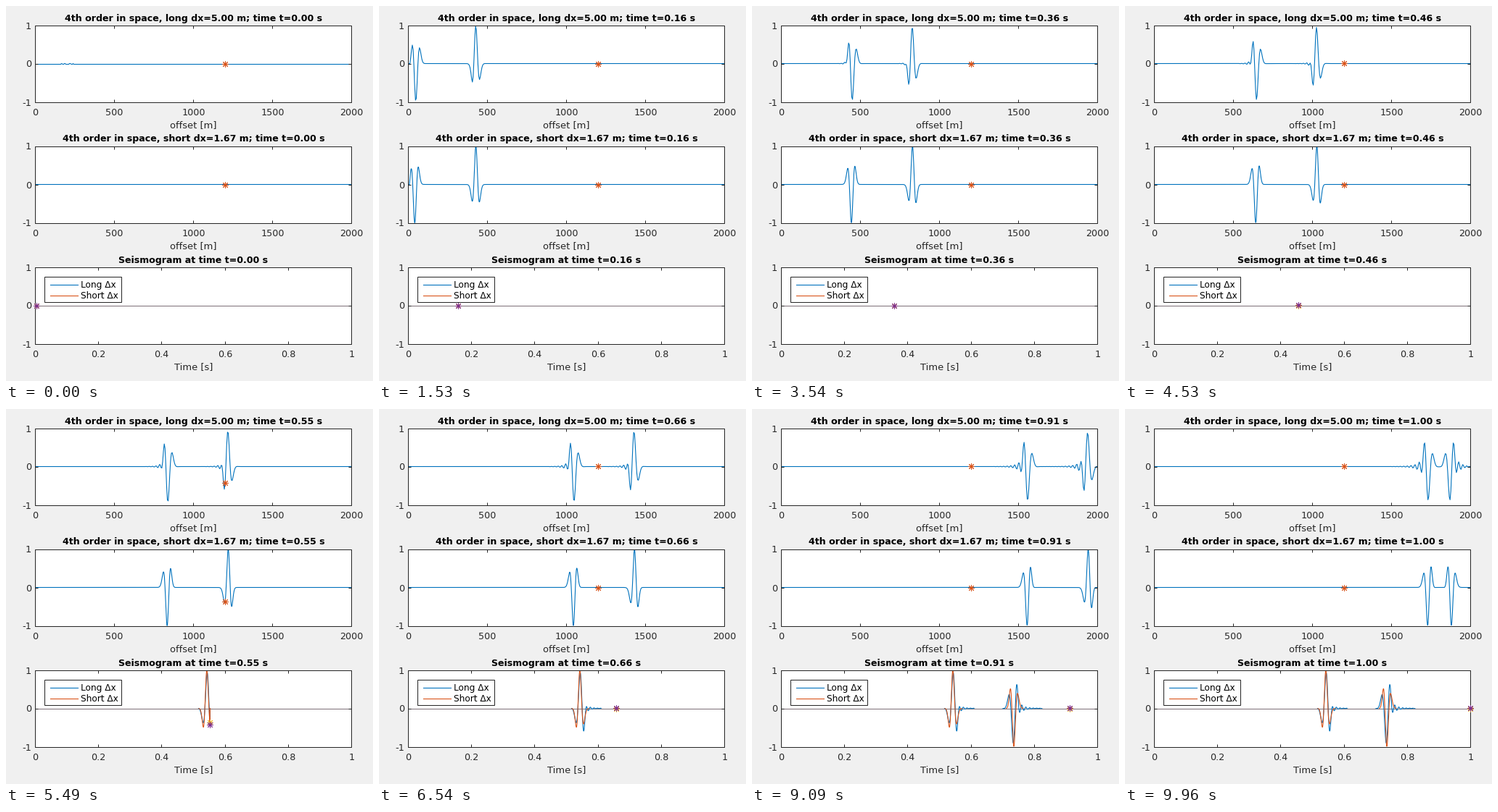
Write a matplotlib script that moves like this. It is 506 px wide and 518 px high and loops after 9990 ms.

```python
import numpy as np
import matplotlib.pyplot as plt
from matplotlib.animation import FuncAnimation
from matplotlib.collections import LineCollection
from matplotlib.patches import Rectangle

W, H, DPI = 506, 518, 128
PX = 72 / DPI  # points per pixel
LEFT, RIGHT, HEIGHT = 40.5, 476.5, 106
TOPS = (26.5, 193.5, 360.5)
BLUE, ORANGE, YELLOW, PURPLE = "#0072bd", "#d95319", "#edb120", "#7e2f8e"
INK, GREY = "#262626", "#7d7078"

FRAMES, STEPS = 333, 6
DT, SPEED, LENGTH = 0.0005, 2000.0, 2000.0
SOURCE, RECEIVER = 200.0, 1200.0
FREQ = 35.0
DELAY = 1.5 / FREQ


def ricker(t):
    a = (np.pi * FREQ * (t - DELAY)) ** 2
    return (1 - 2 * a) * np.exp(-a)


def simulate(n, wall):
    """Fourth-order wave equation on n cells: grid, snapshots, receiver trace."""
    dx = LENGTH / n
    x = np.arange(n + 1) * dx
    src, rec = round(SOURCE / dx), round(RECEIVER / dx)
    r2 = (SPEED * DT / dx) ** 2
    lo, hi = wall + 1, n - 2
    old, u = np.zeros(n + 1), np.zeros(n + 1)
    snaps, trace = [], [0.0]
    for step in range(1, FRAMES * STEPS + 1):
        lap = (16 * (u[lo - 1:hi - 1] + u[lo + 1:hi + 1])
               - u[lo - 2:hi - 2] - u[lo + 2:hi + 2] - 30 * u[lo:hi]) / 12
        new = np.zeros(n + 1)
        new[lo:hi] = 2 * u[lo:hi] - old[lo:hi] + r2 * lap
        t = step * DT
        if t < 2 * DELAY:
            new[src] = ricker(t)
        old, u = u, new
        trace.append(u[rec])
        if step % STEPS == 0:
            snaps.append(u)
    return x, snaps, np.array(trace)


long_x, long_u, long_trace = simulate(400, 2)
short_x, short_u, short_trace = simulate(1200, 4)
times = np.arange(FRAMES * STEPS + 1) * DT

fig = plt.figure(figsize=(W / DPI, H / DPI), dpi=DPI, facecolor="#f0f0f0")
ax = fig.add_axes([0, 0, 1, 1])
ax.set_xlim(0, W)
ax.set_ylim(H, 0)
ax.axis("off")


def to_x(v, span):
    return LEFT + np.asarray(v) / span * (RIGHT - LEFT)


def to_y(v, top):
    return top + HEIGHT / 2 * (1 - np.asarray(v))


def label(x, y, s, size, ha="center", **kw):
    return ax.text(x, y, s, fontsize=size * PX, ha=ha, va="baseline",
                   family="DejaVu Sans", zorder=6, **kw)


def panel(top, ticks, span, xlabel):
    box = Rectangle((LEFT, top), RIGHT - LEFT, HEIGHT, fc="white", ec="none", zorder=0)
    ax.add_patch(box)
    bottom, mid = top + HEIGHT, top + HEIGHT / 2
    marks = [[(LEFT, mid), (LEFT + 4, mid)], [(RIGHT, mid), (RIGHT - 4, mid)]]
    for v in ticks:
        x = round(float(to_x(v, span)) - 0.5) + 0.5
        marks += [[(x, top), (x, top + 4)], [(x, bottom), (x, bottom - 4)]]
        label(x, bottom + 18.5, f"{v:g}", 12.7, color=INK)
    ax.add_collection(LineCollection(marks, colors=INK, linewidths=PX, zorder=3))
    ax.add_patch(Rectangle((LEFT, top), RIGHT - LEFT, HEIGHT, fc="none", ec=INK,
                           lw=PX, zorder=3))
    for v in (1, 0, -1):
        label(35, to_y(v, top) + 5, str(v), 12.7, "right", color=INK)
    label(258.5, bottom + 35.5, xlabel, 13, color=INK)
    return box, label(258.5, top - 6, "", 12.67, weight="bold", color="black")


def curve(color, clip, z):
    line, = ax.plot([], [], color=color, lw=1.1 * PX, zorder=z)
    line.set_clip_path(clip)
    return line


def star(color):
    return ax.plot([], [], ls="none", marker=(8, 2, 0), ms=8.5 * PX, mec=color,
                   mew=PX, zorder=4, clip_on=False)[0]


offsets = (0, 500, 1000, 1500, 2000)
box1, title1 = panel(TOPS[0], offsets, LENGTH, "offset [m]")
box2, title2 = panel(TOPS[1], offsets, LENGTH, "offset [m]")
box3, title3 = panel(TOPS[2], (0, 0.2, 0.4, 0.6, 0.8, 1), 1, "Time [s]")

long_line, short_line = curve(BLUE, box1, 2), curve(BLUE, box2, 2)
long_star, short_star = star(ORANGE), star(ORANGE)
ax.plot([LEFT, RIGHT], [to_y(0, TOPS[2])] * 2, color=GREY, lw=PX, zorder=1)
long_seis, short_seis = curve(BLUE, box3, 2), curve(ORANGE, box3, 2.1)
short_dot, long_dot = star(YELLOW), star(PURPLE)

# legend
ax.add_patch(Rectangle((53.5, 373.5), 106, 35, fc="white", ec=INK, lw=PX, zorder=5))
for y, color, name in ((384.5, BLUE, "Long Δx"), (399.5, ORANGE, "Short Δx")):
    ax.plot([61, 99], [y, y], color=color, lw=1.1 * PX, zorder=6)
    label(103, y + 4.5, name, 12.15, "left", color="black")


def draw_trace(line, trace, now):
    """Recorded part of the trace; the flat parts merge with the grey base line."""
    v = np.where(np.arange(len(trace)) <= now, trace, 0)
    big = np.abs(v) > 0.003
    shown = big.copy()
    shown[1:] |= big[:-1]
    shown[:-1] |= big[1:]
    line.set_data(to_x(times, 1), to_y(np.where(shown, v, np.nan), TOPS[2]))


def update(i):
    now = (i + 1) * STEPS
    t = now * DT
    a, b = long_trace[now], short_trace[now]
    title1.set_text(f"4th order in space, long dx=5.00 m; time t={t:.2f} s")
    title2.set_text(f"4th order in space, short dx=1.67 m; time t={t:.2f} s")
    title3.set_text(f"Seismogram at time t={t:.2f} s")
    long_line.set_data(to_x(long_x, LENGTH), to_y(long_u[i], TOPS[0]))
    short_line.set_data(to_x(short_x, LENGTH), to_y(short_u[i], TOPS[1]))
    rx, tx = to_x(RECEIVER, LENGTH), to_x(t, 1)
    long_star.set_data([rx], [to_y(a, TOPS[0])])
    short_star.set_data([rx], [to_y(b, TOPS[1])])
    draw_trace(long_seis, long_trace, now)
    draw_trace(short_seis, short_trace, now)
    long_dot.set_data([tx], [to_y(a, TOPS[2])])
    short_dot.set_data([tx], [to_y(b, TOPS[2])])
    return (title1, title2, title3, long_line, short_line, long_star, short_star,
            long_seis, short_seis, short_dot, long_dot)


anim = FuncAnimation(fig, update, frames=FRAMES, interval=30, repeat=True,
                     repeat_delay=0)
plt.show()
```
